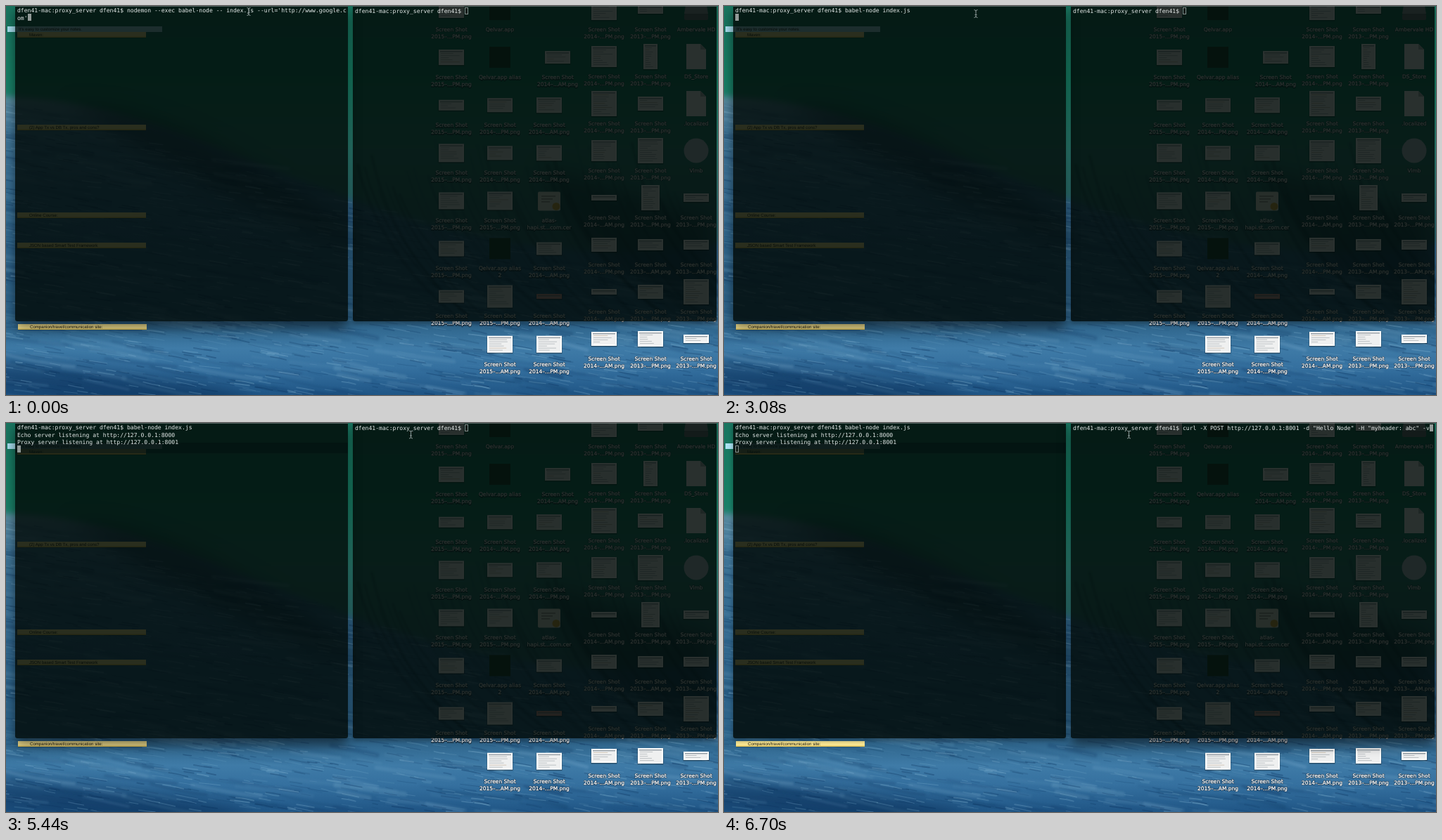
An HTML page with a canvas that plays this animation: 1012x554 px, repeating every 8 s.

```html
<!DOCTYPE html>
<html lang="en">
<head>
<meta charset="utf-8">
<title>Proxy server demo</title>
<style>
  html, body { margin: 0; width: 100%; height: 100%; overflow: hidden; background: #2a5f8c; }
  #stage { position: absolute; left: 0; top: 0; width: 1012px; height: 554px; overflow: hidden; }
  #sea, #desk, #pointer { position: absolute; left: 0; top: 0; }
  #pointer { z-index: 5; }
  text { text-rendering: geometricPrecision; }
  .label { font: 7.5px "DejaVu Sans", "Open Sans", sans-serif; fill: #fff; stroke: #fff;
    stroke-width: .3px; text-anchor: middle; }
  .label.shade { fill: #04101c; stroke: #04101c; stroke-width: 1.4px; opacity: .65; }
  .note { font: 6.1px "Liberation Sans", Arial, sans-serif; fill: #16140a; }
  .win { position: absolute; top: 0; height: 449px; box-sizing: border-box; z-index: 1;
    background: rgba(2, 10, 8, .84); border-top: 1px solid rgba(165, 178, 176, .45);
    border-radius: 0 0 3px 3px; box-shadow: 0 4px 7px rgba(0, 0, 0, .35); }
  .win.focus { z-index: 2; box-shadow: 0 9px 17px rgba(0, 0, 0, .55); }
  .lines { position: absolute; left: 3px; margin: 0; white-space: pre; color: #e4e9e8;
    font: 8.1px/10.35px "DejaVu Sans Mono", "Liberation Mono", monospace;
    text-rendering: geometricPrecision; }
  .caret { position: absolute; width: 5px; height: 10px; box-sizing: border-box;
    border: 1px solid #858d8b; }
  .focus .caret { background: #929a98; border-color: #929a98; }
  .veil { position: absolute; left: 0; right: 0; top: 27px; height: 15px;
    background: rgba(3, 16, 14, .5); }
</style>
</head>
<body>
<div id="stage">
  <canvas id="sea" width="1012" height="554"></canvas>
  <svg id="desk" width="1012" height="554"></svg>
  <div class="win" id="left" style="left:13px;width:473px">
    <div class="veil"></div><div class="caret"></div><pre class="lines" style="top:.4px"></pre>
  </div>
  <div class="win" id="right" style="left:493px;width:517px">
    <div class="caret"></div><pre class="lines" style="top:1px"></pre>
  </div>
  <svg id="pointer" width="1012" height="554">
    <path id="beam" d="M-2.5-5.5Q0-5.5 0-3.5Q0-5.5 2.5-5.5M0-3.5V3.5M-2.5 5.5Q0 5.5 0 3.5Q0 5.5 2.5 5.5M-1.5 1.5H1.5"
      fill="none" stroke="#8c9997"/>
    <path id="arrow" d="M0 0V9L2 7.2L3.5 10.6L5 10L3.6 6.7L6.4 6.5Z" fill="#000" stroke="#e8ecec" stroke-width=".8"/>
  </svg>
</div>
<script>
const $ = id => document.getElementById(id);
const desk = $('desk');

function add(tag, attrs, text) {
  const el = document.createElementNS('http://www.w3.org/2000/svg', tag);
  for (const k in attrs) el.setAttribute(k, attrs[k]);
  if (text) el.textContent = text;
  desk.appendChild(el);
}
const box = (x, y, w, h, fill, more) => add('rect', {x, y, width: w, height: h, fill, ...more});

let seed = 41;
function rand() {
  seed = (seed * 1664525 + 1013904223) % 4294967296;
  return seed / 4294967296;
}

// Wallpaper: green wave face above, blue water below
function paintSea() {
  const g = $('sea').getContext('2d');
  const ramp = (y0, y1, stops) => {
    const r = g.createLinearGradient(0, y0, 0, y1);
    stops.forEach(([at, c]) => r.addColorStop(at, c));
    return r;
  };
  g.fillStyle = ramp(0, 554, [[0, '#5f929f'], [.24, '#5a8ba0'], [.32, '#417698'], [.5, '#33698f'],
    [.75, '#2d6389'], [.83, '#31688f'], [.88, '#3f7ba7'], [.93, '#35709f'], [1, '#1f5585']]);
  g.fillRect(0, 0, 1012, 554);

  g.save();
  g.filter = 'blur(4px)';
  g.fillStyle = ramp(0, 340, [[0, '#1a7560'], [.3, '#178066'], [.6, '#2c8074'], [1, '#2f6872']]);
  g.beginPath();
  g.moveTo(-20, -20);
  g.lineTo(-20, 128);
  g.bezierCurveTo(160, 132, 260, 190, 490, 275);
  g.bezierCurveTo(640, 330, 850, 380, 1040, 330);
  g.lineTo(1040, -20);
  g.fill();
  g.filter = 'blur(14px)';
  g.fillStyle = 'rgba(8,30,44,.42)';
  g.beginPath();
  g.moveTo(90, 140);
  g.bezierCurveTo(220, 135, 380, 230, 520, 345);
  g.bezierCurveTo(370, 310, 210, 220, 90, 140);
  g.fill();
  g.beginPath();
  g.moveTo(760, 230);
  g.quadraticCurveTo(830, 400, 1000, 440);
  g.lineTo(1000, 300);
  g.fill();
  g.fillStyle = 'rgba(8,42,82,.6)';
  g.beginPath();
  g.ellipse(110, 540, 240, 22, .1, 0, 7);
  g.fill();
  g.restore();

  // Ripples: long soft bands first, then fine streaks
  const ripple = (count, long, wide, strength) => {
    for (let i = 0; i < count; i++) {
      const x = rand() * 1100 - 80, y = 130 + rand() * 430;
      const len = long * (.3 + rand()), drop = len * (.1 + rand() * .13);
      if (y < 135 + x * .28 && y < 435) continue;
      const a = strength * (.3 + rand());
      g.strokeStyle = rand() < .52 ? `rgba(140,188,216,${a})` : `rgba(8,44,86,${a})`;
      g.lineWidth = wide * (.3 + rand());
      g.beginPath();
      g.moveTo(x, y);
      g.quadraticCurveTo(x + len / 2, y + drop * (.2 + rand() * .6), x + len, y + drop);
      g.stroke();
    }
  };
  g.lineCap = 'round';
  g.save();
  g.filter = 'blur(1.5px)';
  ripple(420, 90, 5, .17);
  g.restore();
  ripple(2600, 24, 1.7, .24);

  g.save();
  g.filter = 'blur(1px)';
  for (let i = 0; i < 46; i++) {
    const x = 560 + i * 10;
    g.strokeStyle = `rgba(5,26,42,${.06 + rand() * .16})`;
    g.lineWidth = 1 + rand() * 4;
    g.beginPath();
    g.moveTo(x - 60, 190 + rand() * 90);
    g.quadraticCurveTo(x - 30, 350, x + 60 + rand() * 40, 440);
    g.stroke();
  }
  g.restore();
}

function label(x, y, rows) {
  rows.forEach((s, i) => {
    add('text', {x, y: y + 3.4 + i * 10, class: 'label shade'}, s);
    add('text', {x, y: y + 2.8 + i * 10, class: 'label'}, s);
  });
}

function thumb(x, y, w, h, fill = '#fdfdfc') {
  const l = x - w / 2, t = y - h / 2;
  box(l - .5, t + .5, w + 1, h + 1, '#000', {opacity: .35});
  box(l, t, w, h, fill);
  box(l + 2, t + 2, w - 4, h - 4, '#d3d8d9', {opacity: .35});
  box(l + 2, t + 2, w - 4, 1.4, '#55636e', {opacity: .6});
  for (let r = t + 5; r < t + h - 3; r += 3) {
    box(l + 3, r, (w - 7) * (.3 + rand() * .65), 1, rand() < .2 ? '#b7a487' : '#8a9399', {opacity: .5});
  }
}

const page = (x, y) => {
  add('path', {d: `M${x - 14} ${y - 18}h20l8 8v28h-28z`, fill: '#f4f5f5'});
  add('path', {d: `M${x + 6} ${y - 18}v8h8z`, fill: '#b8bdbf'});
};
const shapes = {
  app: (x, y) => box(x - 15, y - 15, 30, 30, '#1c3f2b'),
  disc: (x, y) => add('circle', {cx: x, cy: y, r: 17.5, fill: '#b9c6d0'}),
  page,
  drive: (x, y) => {
    add('path', {d: `M${x - 13} ${y - 18}h26l4 24h-34z`, fill: '#9da4a8'});
    box(x - 17, y + 6, 34, 9, '#6f777c', {rx: 2});
  },
  cert: (x, y) => {
    box(x - 16, y - 13, 32, 27, '#eceae0', {rx: 2});
    for (let i = 0; i < 3; i++) box(x - 11, y - 7 + i * 4, 20 - i * 4, 1, '#77746c');
    add('circle', {cx: x + 10, cy: y + 8, r: 5.5, fill: '#e0b040'});
  }
};

// Column: x, row pitch, cells. A cell is "width x height : year + A/P", a "shape:label" or empty.
const columns = [
  [633, 68.1, '36x24:15P|36x22:15P|36x15:15P|36x26:15P|36x24:15P|36x22:15P|36x18:15P'],
  [702, 68.1, 'app:Qelvar.app|app:Qelvar.app alias|36x20:14P|36x20:14P|36x26:15P|app:Qelvar.app alias/2|36x32:15P|36x24:15A'],
  [772, 68.1, '|36x18:14A|36x22:14A|36x22:14P|cert:atlas-/hapi.st...com.cer|36x18:14A|36x7:14A|36x24:14P'],
  [850, 67, '36x30:14P|36x30:14P|36x36:14P|36x30:14P|36x8:14A|36x20:14P|36x8:14A|36x20:14A'],
  [916, 67, '36x12:13P|20x36:13P|36x20:13P|36x36:13P|26x36:13P|36x16:13A|36x20:13P|36x22:13P'],
  [981, 67, 'drive:Ambervale HD|page:DS_Store|page:.localized|disc:Vimb|36x12:13P|36x14:13A|36x36:13P|36x12:13P']
];

function paintDesk() {
  const notes = [[37, 'Maven:'], [169, '(2) App Tx vs DB Tx, pros and cons?'], [294, 'Online Course:'],
    [337, 'JSON based Smart Test Framework'], [453, 'Companion/travel/communication site:']];
  box(2, 29, 220, 8, '#a9e2f2');
  add('text', {x: 18, y: 35, class: 'note'}, "It's easy to customize your notes.");
  notes.forEach(([y, s], i) => {
    const x = i === 4 ? 17 : 16;
    box(x, y + .5, 183, 8, '#000', {opacity: .3});
    box(x, y, 183, 8, '#ffec96');
    box(x, y + 6.5, 183, 1.5, '#e0c45a');
    add('text', {x: x + 17, y: y + 5.8, class: 'note'}, s);
  });

  columns.forEach(([cx, pitch, cells], c) => cells.split('|').forEach((cell, i) => {
    if (!cell) return;
    const [kind, name] = cell.split(':');
    const x = c === 2 && i === 1 ? 784 : cx, y = 5 + i * pitch;
    if (shapes[kind]) {
      shapes[kind](x, y);
      label(x, 33 + i * pitch, name.split('/'));
    } else {
      const [w, h] = kind.split('x').map(Number);
      thumb(x, y, w, h, h === 7 ? '#d99a94' : undefined);
      label(x, 33 + i * pitch, ['Screen Shot', `20${name.slice(0, 2)}–...${name[2]}M.png`]);
    }
  }));
}

const LOOP = 8000, FOCUS = 5590, CHAR = 4.877, ROW = 10.35;
const prompt = 'dfen41-mac:proxy_server dfen41$ ';
const run = prompt + 'babel-node index.js';
const leftSteps = [
  [0, [prompt + "nodemon --exec babel-node -- index.js --url='http://www.google.c", "om'"]],
  [1490, [run]],
  [2480, [run, '']],
  [3220, [run, 'Echo server listening at http://127.0.0.1:8000',
    'Proxy server listening at http://127.0.0.1:8001', '']]
];
const rightSteps = [
  [0, [prompt]],
  [5890, [prompt + 'clear']],
  [6100, [prompt + 'curl -v http://127.0.0.1:8001']],
  [6700, [prompt + 'curl -X POST http://127.0.0.1:8001 -d "Hello Node" -H "myheader: abc" -v']]
];
const pointerSteps = [
  [0, 'beam', 345, 8], [2930, 'beam', 354, 9], [3080, 'beam', 358, 11], [3220, 'beam', 367, 22],
  [3370, 'beam', 428, 39], [3520, 'beam', 429, 39], [3670, 'beam', 460, 39], [3810, 'beam', 461, 39],
  [3960, 'beam', 451, 37], [4110, 'arrow', 535.5, 14], [4260, 'arrow', 551, 8], [4410, 'arrow', 563, 2],
  [4560, 'arrow', 569, -1], [4700, 'arrow', 573, 6], [5150, 'arrow', 573, 12], [5300, 'arrow', 574, 15],
  [5440, 'beam', 575.5, 16.5]
];
const at = (steps, t) => steps.findLast(s => s[0] <= t);

function showShell(id, lines, focus) {
  const win = $(id), caret = win.querySelector('.caret'), pre = win.querySelector('.lines');
  const text = lines.join('\n'), last = lines.length - 1;
  if (pre.textContent !== text) pre.textContent = text;
  win.classList.toggle('focus', focus);
  caret.style.left = 3 + lines[last].length * CHAR + 'px';
  caret.style.top = Math.round(last * ROW) + (id === 'right' ? 1 : 0) + 'px';
}

function show(t) {
  showShell('left', at(leftSteps, t)[1], t < FOCUS);
  showShell('right', at(rightSteps, t)[1], t >= FOCUS);
  document.querySelector('.veil').style.opacity = t < 3220 ? 0 : 1;
  const [, kind, x, y] = at(pointerSteps, t);
  for (const id of ['beam', 'arrow']) {
    $(id).style.display = id === kind ? '' : 'none';
    $(id).setAttribute('transform', `translate(${x} ${y})`);
  }
}

paintSea();
paintDesk();
const start = performance.now();
function tick() {
  show((performance.now() - start) % LOOP);
  requestAnimationFrame(tick);
}
tick();
</script>
</body>
</html>
```
